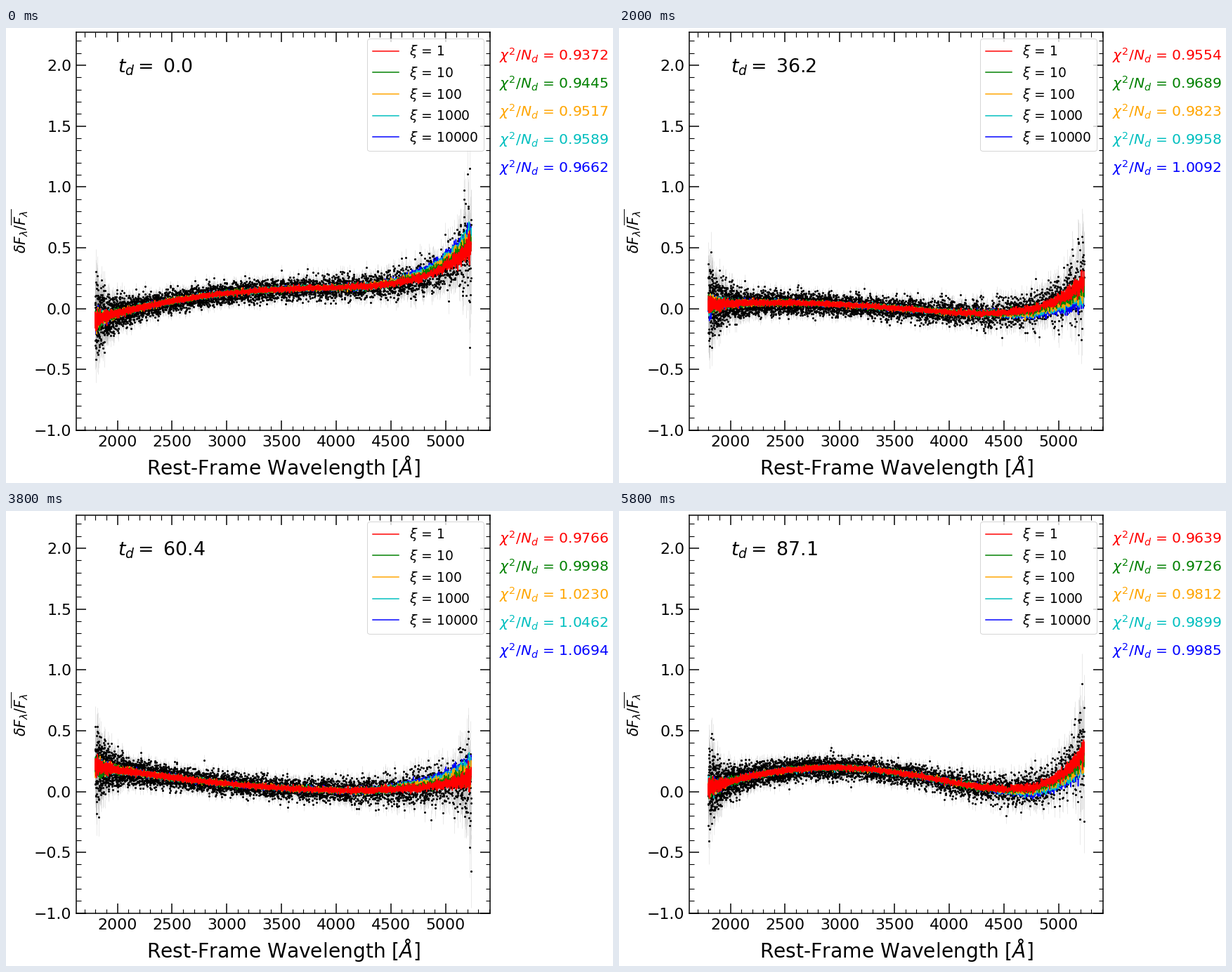
Animation of 864x648 px, one loop 6000 ms. Source, as a matplotlib script:

```python
import numpy as np
import matplotlib.pyplot as plt
from matplotlib.animation import FuncAnimation
from matplotlib.ticker import AutoMinorLocator, MultipleLocator

plt.rcParams.update({"font.family": "DejaVu Sans", "mathtext.fontset": "dejavusans"})

W, H, DPI = 864, 648, 72
FRAMES, STEP = 30, 200
LO, HI = 1797, 5233
COLORS = ["r", "g", "orange", "c", "b"]

# Key poses: step, delay, first and last score, trend height at each anchor
POSES = np.array([
    (0, 0.0, 0.9372, 0.9662, -0.09, 0.125, 0.18, 0.49),
    (3, 11.6, 0.9903, 1.0512, 0.01, 0.11, 0.06, 0.17),
    (7, 28.7, 0.9568, 0.9696, 0.01, 0.005, -0.04, 0.13),
    (13, 43.8, 0.9541, 1.0488, 0.06, 0.06, -0.035, 0.27),
    (19, 60.4, 0.9766, 1.0694, 0.21, 0.065, 0.01, 0.10),
    (26, 77.0, 0.9604, 0.9624, 0.12, 0.185, 0.10, 0.35),
    (29, 87.1, 0.9639, 0.9985, 0.03, 0.195, 0.05, 0.30),
])
ANCHORS = np.array([1800, 3000, 4200, 5200])

# Log-spaced wavelength grid, noisier towards both ends
wave = np.geomspace(LO, HI, 4640)
blue, red = LO - wave, wave - HI
sigma = (0.041 + 0.11 * np.exp(blue / 80) + 0.03 * np.exp(blue / 300)
         + 0.08 * np.exp(red / 500) + 0.15 * np.exp(red / 60))
ramp = np.clip((wave - 4400) / (HI - 4400), 0, 1)
ripple = np.random.default_rng(7).normal(size=wave.size)


def basis(x):
    """Parabola plus an exponential upturn at the red end."""
    v = (x - 3000) / 1200
    return np.column_stack([np.ones_like(v), v, v * v, np.exp((x - 5200) / 480)])


def pose(n):
    return [np.interp(n, POSES[:, 0], col) for col in POSES[:, 1:].T]


def from_top(x, y):
    return x / W, 1 - y / H


fig = plt.figure(figsize=(W / DPI, H / DPI), dpi=DPI, facecolor="white")
ax = fig.add_axes([100.2 / W, 1 - 572.8 / H, 588.5 / W, 566.8 / H])
ax.set_xlim(1625, 5405)
ax.set_ylim(-1, 2.271)
for spine in ax.spines.values():
    spine.set_linewidth(1.5)
for axis, major in ((ax.xaxis, 500), (ax.yaxis, 0.5)):
    axis.set_major_locator(MultipleLocator(major))
    axis.set_minor_locator(AutoMinorLocator(5))
ax.tick_params(which="both", direction="in", top=True, right=True)
ax.tick_params(which="major", length=14, width=1.5, pad=7, labelsize=22)
ax.tick_params(which="minor", length=6.5, width=1.1)

fig.text(*from_top(395, 635.5), r"Rest-Frame Wavelength [$\AA$]", size=28.1,
         ha="center", va="baseline")
fig.text(*from_top(28.7, 289.5), r"$\delta F_{\lambda}/\overline{F_{\lambda}}$",
         size=20.5, rotation=90, rotation_mode="anchor", ha="center", va="baseline")

bars = ax.vlines(wave, 0 * wave, 0 * wave, colors="0.65", alpha=0.35, lw=0.7, zorder=1)
dots, = ax.plot([], [], "ko", ms=3, mew=0, zorder=2)
curves = [ax.plot([], [], color=c, lw=1.5, zorder=9 - k, label=rf"$\xi$ = {10 ** k}")[0]
          for k, c in enumerate(COLORS)]
ax.legend(loc="upper right", fontsize=18.7, labelspacing=0.41, borderpad=0.4,
          borderaxespad=0.47).set_zorder(20)

clock = fig.text(*from_top(158.8, 63.5), "", size=26.7, va="baseline")
scores = [fig.text(*from_top(701.5, 46 + 39.85 * k), "", color=c, size=20.3, va="baseline")
          for k, c in enumerate(COLORS)]


def draw(n):
    rng = np.random.default_rng(100 + n)
    delay, first, last, *heights = pose(n)
    trend = basis(wave) @ np.linalg.solve(basis(ANCHORS), heights)
    spread = 0.11 * np.cos(2 * np.pi * n / 20)

    flux = trend + sigma * rng.normal(size=wave.size)
    err = sigma * rng.uniform(0.9, 1.15, wave.size)
    ends = np.column_stack([flux - err, flux + err])
    bars.set_segments(np.stack([np.column_stack([wave, wave]), ends], axis=2))
    dots.set_data(wave, flux)

    clock.set_text(rf"$t_d =$ {delay:.1f}")
    for k, (curve, score) in enumerate(zip(curves, scores)):
        part = k / 4
        jitter = 0.2 * ripple + 0.14 * rng.normal(size=wave.size)
        curve.set_data(wave, trend + spread * ramp * part + sigma * jitter)
        score.set_text(rf"$\chi^2/N_d$ = {first + (last - first) * part:.4f}")
    return [bars, dots, *curves, clock, *scores]


anim = FuncAnimation(fig, draw, frames=FRAMES, interval=STEP, repeat=True,
                     repeat_delay=0, blit=False)
plt.show()
```
